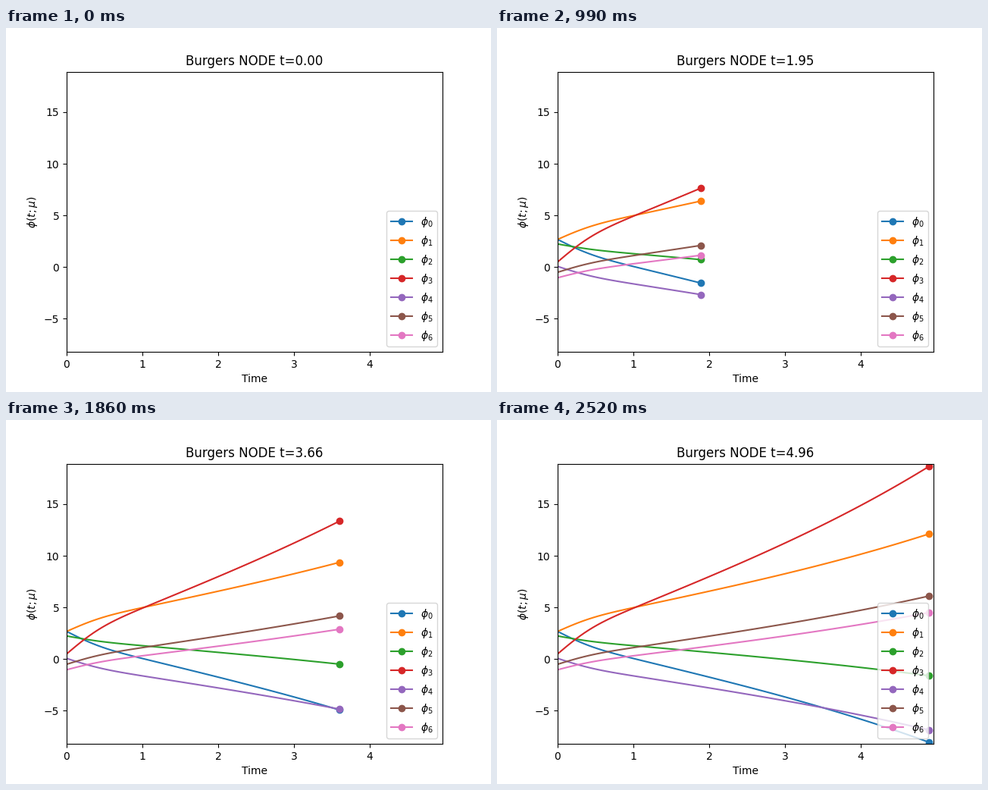
Recreate the animation shown at these times as a matplotlib script. Size 640 px wide and 480 px high, loop 2.55 s.

```python
import math

import numpy as np
import matplotlib.pyplot as plt
from matplotlib.animation import FuncAnimation

FRAMES = 85
INTERVAL = 30
T_END = 4.96

# Every coordinate follows one shared trend, from its own start at its own gain
STARTS = np.array([2.68, 2.68, 2.24, 0.5, 0.07, -0.5, -1.03])
GAINS = np.array([-0.591, 0.52, -0.212, 1, -0.382, 0.364, 0.305])


def trend(t):
    """Quick initial rise that settles into slowly accelerating growth."""
    transient = 1.39 * np.vectorize(math.erf)(t / 0.5)
    return transient + 3.113 * t - 0.098 * t**2 + 0.0328 * t**3


times = np.linspace(0, T_END, FRAMES)
phi = STARTS[:, None] + GAINS[:, None] * trend(times)

fig, ax = plt.subplots(figsize=(6.4, 4.8), dpi=100)
lines = [ax.plot([], [], marker="o", label=rf"$\phi_{i}$")[0]
         for i in range(len(phi))]
ax.set_xlim(0, T_END)
ax.set_ylim(-8.213, 18.917)
ax.set_xlabel("Time")
ax.set_ylabel(r"$\phi(t;\mu)$")
ax.legend(loc="lower right")
title = ax.set_title("Burgers NODE t=0.00")


def update(k):
    n = max(k, 1)
    for line, y in zip(lines, phi):
        line.set_data(times[:n], y[:n])
        line.set_markevery([n - 1])  # dot only at the head
        line.set_visible(k > 0)
    title.set_text(f"Burgers NODE t={times[k]:.2f}")
    return [*lines, title]


anim = FuncAnimation(fig, update, frames=FRAMES, interval=INTERVAL,
                     repeat=True, repeat_delay=0)
plt.show()
```
